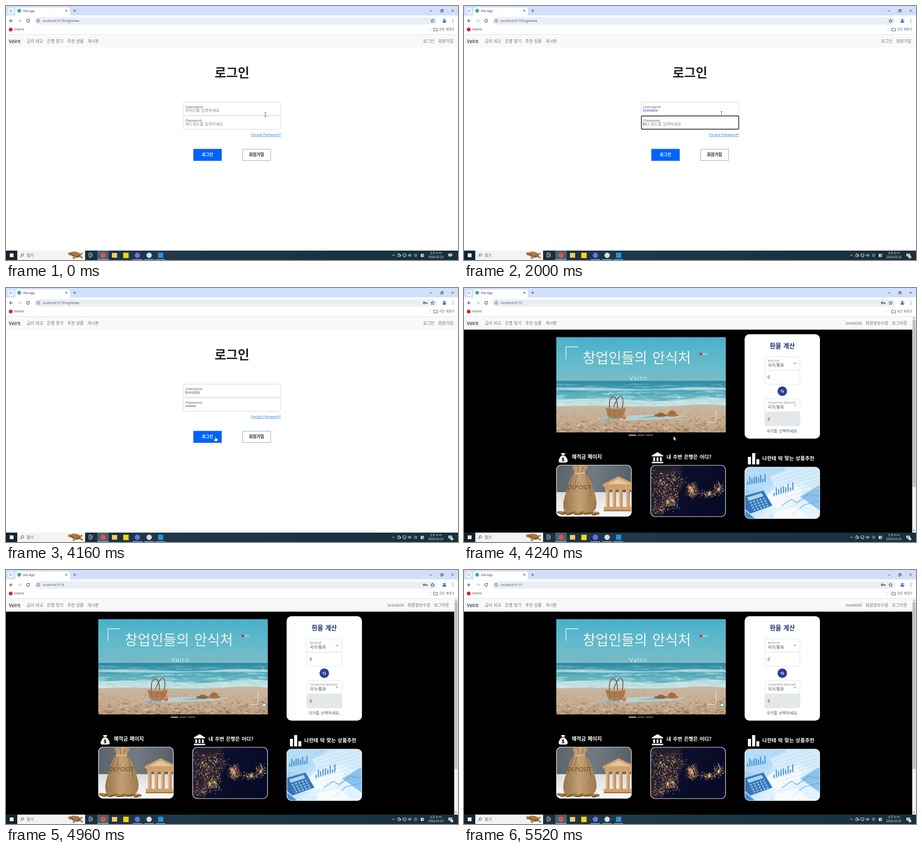
Animation of 960 by 540 pixels, one loop 5.6 s. Source, as an HTML page with a canvas:

```html
<!DOCTYPE html>
<html lang="ko">
<head>
<meta charset="utf-8">
<title>Login demo</title>
<style>
html, body { margin: 0; width: 100%; height: 100%; overflow: hidden; background: #fff; }
canvas { display: block; width: 960px; height: 540px; }
</style>
</head>
<body>
<canvas id="stage" width="960" height="540"></canvas>
<script>
const LOOP = 5600, HOME_AT = 4200;
const BRAND = 'Velrit', USER = 'brenkitl4';
const UI = '"Noto Sans", "Noto Sans CJK KR", "Noto Sans CJK", sans-serif';
const ARIAL = '"Liberation Sans", "Noto Sans CJK KR", "Noto Sans CJK", sans-serif';
const KR = '"Noto Sans CJK KR", "Noto Sans CJK", sans-serif';
const stage = document.getElementById('stage').getContext('2d');
let c = stage;

// ---- helpers ----
function box(x, y, w, h, fill, r = 0, stroke, lw = 1) {
  c.beginPath();
  c.roundRect(x, y, w, h, r);
  if (fill) { c.fillStyle = fill; c.fill(); }
  if (stroke) { c.strokeStyle = stroke; c.lineWidth = lw; c.stroke(); }
}
function disc(x, y, rx, fill, ry = rx, turn = 0) {
  c.beginPath();
  c.ellipse(x, y, rx, ry, turn, 0, 7);
  c.fillStyle = fill;
  c.fill();
}
function ring(x, y, r, color, lw = 1, from = 0, to = 7) {
  c.beginPath();
  c.arc(x, y, r, from, to);
  c.strokeStyle = color; c.lineWidth = lw; c.stroke();
}
function path(d, fill, stroke, lw = 1) {
  const p = new Path2D(d);
  if (fill) { c.fillStyle = fill; c.fill(p); }
  if (stroke) { c.strokeStyle = stroke; c.lineWidth = lw; c.stroke(p); }
}
function text(s, x, y, size, color, { font = UI, weight = 400, align = 'left', gap = 0 } = {}) {
  c.font = `${weight} ${size}px ${font}`;
  c.textAlign = align;
  c.letterSpacing = gap + 'px';
  c.wordSpacing = (font === KR ? size * .13 : 0) + 'px';
  c.fillStyle = color;
  c.fillText(s, x, y);
}
function fade(x0, y0, x1, y1, ...colors) {
  const g = c.createLinearGradient(x0, y0, x1, y1);
  colors.forEach((k, i) => g.addColorStop(i / (colors.length - 1), k));
  return g;
}
function randomizer(seed) {
  return () => (seed = (seed * 16807) % 2147483647) / 2147483647;
}
function layer(draw) {
  const outer = c, cv = document.createElement('canvas');
  cv.width = 960; cv.height = 540;
  c = cv.getContext('2d');
  draw();
  c = outer;
  return cv;
}
function photo(x, y, w, h, r, draw, blur) {
  const picture = layer(() => { c.translate(20, 20); draw(); });
  c.save();
  c.beginPath();
  c.roundRect(x, y, w, h, r);
  c.clip();
  c.filter = `blur(${blur}px)`;
  c.drawImage(picture, x - 20, y - 20);
  c.restore();
}

// ---- browser and desktop ----
function browser(url) {
  box(0, 0, 960, 540, '#fff');
  box(0, 0, 960, 20, '#d0e0fc');
  box(4, 4, 13, 13, '#e9f1ff', 4);
  path('M8 9.2l2 2l2 -2', null, '#333');
  box(20, 3, 116, 20, '#fff', 6);
  disc(28, 10, 4, '#3fb27f');
  text('Vite App', 36, 13, 6.4, '#444');
  path('M126 8l4 4M130 8l-4 4M143 10h5.4M145.7 7.3v5.4', null, '#333', .9);
  path('M900 10.5h5M946 7.5l5 5M951 7.5l-5 5M923 9h4v4h-4zM924.5 9v-1.5h4v4h-1.5', null, '#222', .8);
  box(0, 20, 960, 40, '#fff');
  path('M14.5 31.5h-6M11 28.5l-3 3l3 3', null, '#444', 1.1);
  path('M26 31.5h6M29.5 28.5l3 3l-3 3', null, '#b8bbc0', 1.1);
  ring(47, 31.5, 3, '#444', 1.1, .2, 5.4);
  path('M50.5 27.8v3h-3z', '#444');
  box(61, 24, 855, 15.5, '#e9eef7', 7.75);
  ring(68.5, 31.5, 3.2, '#444', .8);
  path('M68.5 31v2.2M68.5 29.3v.8', null, '#444', .9);
  text(url, 78, 34, 6.7, '#555960');
  path('M906 27.8l1.1 2.5l2.7 .2l-2 1.8l.6 2.7l-2.4 -1.4l-2.4 1.4l.6 -2.7l-2 -1.8l2.7 -.2z', null, '#333', .9);
  disc(931, 31.5, 5.5, '#d3e3fd');
  disc(931, 29.7, 1.8, '#1456b8');
  path('M927.5 35q0 -3 3.5 -3t3.5 3z', '#1456b8');
  for (const y of [28.5, 31.5, 34.5]) disc(949, y, .8, '#444');
  disc(10, 50, 4, '#d8232a');
  text('Vidorfa', 17, 52.4, 6.3, '#555');
  path('M900.5 46v8', null, '#cfd6e4');
  path('M908.5 47h3l1 1.3h4v4.7h-8z', null, '#444', .9);
  text('모든 북마크', 920, 52.4, 6.5, '#555', { font: KR });
  box(0, 60, 960, 28.5, '#f8f9fa');
  box(0, 60, 960, 1, '#dfe2e7');
}
function navbar(links) {
  text(BRAND, 6, 78.5, 10.2, '#111');
  [['금리 비교', 44], ['은행 찾기', 87], ['추천 상품', 130], ['게시판', 173], ...links]
    .forEach(([s, x]) => text(s, x, 77.6, 8.7, '#707070', { font: KR }));
}
function turtle() {
  disc(136, 527, 4, '#a77b43', 3.2, .4);
  disc(148, 528.5, 11, '#87562d', 5.8, .22);
  disc(148, 527, 8, '#bd8850', 3.6, .22);
  path('M142 525l3 4m2 -5l1 6m5 -5l-1 6', null, '#6c411f', .9);
  disc(145, 534.5, 2.6, '#b18a55', 4, .7);
  disc(160, 534, 4.2, '#a77b43', 1.7, .5);
  disc(160, 527, 3, '#b18a55', 2, -.3);
}
function taskbar() {
  box(0, 520, 960, 20, fade(0, 0, 960, 0, '#15242f', '#20384a', '#1c3343', '#18303c'));
  box(8, 526, 8, 8, '#f4f7fa');
  box(24, 520, 144, 20, '#f3f3f3');
  ring(35, 529, 2.6, '#333', .9);
  path('M33 531l-3 3', null, '#333', .9);
  text('찾기', 44, 533, 8, '#555', { font: KR });
  turtle();
  path('M176 527h5v5h-5zM176 524.8h5M176 534.2h5M183.3 525v9', null, '#e8edf1', .9);
  box(194, 520, 24, 20, '#496171');
  disc(206, 530, 5.7, '#df5343');
  box(225, 525, 11, 10, '#f2cc62');
  box(249, 524.5, 11.5, 11.5, '#f7d313');
  disc(279, 530, 5.7, '#6673e6');
  disc(304, 530, 5.7, '#d9dce2');
  box(323, 524.5, 11, 11, '#2a91d9');
  for (const [x, w] of [[194, 24], [269, 20], [294, 20], [318, 20]]) box(x, 538.5, w, 1.5, '#75b9e8');
  const ink = '#e4ebef';
  path('M820 531.5l3 -3l3 3', null, ink);
  path('M832 528h4v5h-4zM836 530l2.5 -1.5v4zM833 526.5h3M843 527h6.5v4.5h-6.5zM844.5 533.5h4M854 529h2l2 -2v6l-2 -2h-2zM859.5 528q2 2 0 4', null, ink, .9);
  ring(870, 530, 3, '#aeb9c1', .9);
  path('M868.5 530h3M870 528.5v3', null, '#aeb9c1', .8);
  box(881, 527, 6.5, 6.5, ink);
  path('M882.5 529h2v3M886 528v5', null, '#20303c', .7);
  text('오후 8:33', 913, 527.2, 6.1, ink, { align: 'center' });
  text('2024-05-23', 913, 536.4, 6.2, ink, { align: 'center' });
  path('M939.5 526.5h8v5.5h-4l-1.5 2v-2h-2.5z', ink);
  path('M941 528.4h5M941 530.2h5', null, '#20303c', .6);
}
function badge() {
  disc(947, 533.5, 3, '#e8edf0');
  text('7', 947, 535.6, 5.5, '#1a2a35', { align: 'center' });
}
function keyIcon() {
  ring(888, 31.5, 1.8, '#333', 1.2);
  path('M890 31.5h5M892.5 31.5v2M894.5 31.5v2', null, '#333', 1.2);
}

// ---- login page ----
function loginPage() {
  browser('localhost:5173/loginview');
  navbar([['로그인', 886], ['회원가입', 918]]);
  text('로그인', 480, 151.5, 26.8, '#212529', { font: KR, weight: 700, align: 'center' });
  text('Forgot Password?', 584, 276, 7.66, '#2f7fe0', { align: 'right' });
  box(520, 277, 64, .8, '#2f7fe0');
  box(398, 304, 60, 25, '#0062ff', 0, '#4b83dc', .8);
  box(502.5, 304.5, 59.5, 24, '#fff', 0, '#91a5c8');
  const bold = { font: KR, weight: 700, align: 'center' };
  text('로그인', 428, 319.2, 8.7, '#fff', bold);
  text('회원가입', 532, 319.2, 8.7, '#222', bold);
  taskbar();
}
function field(y, label, hint, focused) {
  box(376.5, y + .5, 207, 28.5, '#fff', 2, '#d6d6d6');
  if (focused) box(376.7, y + .7, 206.8, 28, null, 2, '#17171c', 1.5);
  text(label, 381, y + 12.6, 8, '#666', { font: ARIAL });
  if (hint) text(hint, 381, y + 21.2, 8.4, '#858585', { font: KR });
}
const typed = (t, start, step, max) => Math.max(0, Math.min(max, Math.floor((t - start) / step) + 1));

function loginState(t) {
  const nameLen = typed(t, 720, 110, USER.length);
  const dots = typed(t, 2640, 120, 8);
  const focus = t < 400 || t >= 4080 ? '' : t < 1840 ? 'name' : 'pass';
  field(204, 'Username', nameLen ? '' : '아이디를 입력하세요', focus === 'name');
  field(233, 'Password', dots ? '' : '패스워드를 입력하세요', focus === 'pass');
  text(USER.slice(0, nameLen), 380.5, 225, 8.2, '#3d62c8', { font: ARIAL });
  const nameEnd = 381 + c.measureText(USER.slice(0, nameLen)).width;
  for (let i = 0; i < dots; i++) disc(382.3 + i * 2.85, 251, 1.15, '#3158c0');
  if (dots) keyIcon();
  if (t > 400) badge();

  const lastKey = focus === 'name'
    ? (nameLen ? 720 + (nameLen - 1) * 110 : 400)
    : (dots ? 2640 + (dots - 1) * 120 : 1840);
  if (focus && (t - lastKey) % 1060 < 530) {
    const [x, y] = focus === 'name' ? [nameEnd, 218] : [380.5 + dots * 2.85, 247];
    box(x, y, .8, 8.5, '#333');
  }
}

// ---- home page pictures ----
function beach() {
  const rnd = randomizer(71);
  box(-20, -20, 400, 115, fade(0, 0, 0, 95, '#48b0cb', '#58b7cc', '#66bbcb', '#7cbcc6'));
  for (let i = 0; i < 14; i++) disc(rnd() * 360, 74 + rnd() * 16, 40, 'rgba(120,175,188,.15)', 3);
  box(-20, 93, 400, 62, fade(0, 93, 0, 150, '#2b86a2', '#4aa5b7', '#6fbcc6', '#a9d3d3'));
  for (let i = 0; i < 230; i++) {
    const depth = rnd();
    box(rnd() * 400 - 30, 98 + depth * 46, 8 + rnd() * 30, .7 + depth * 1.5,
      rnd() < .35 ? 'rgba(42,135,158,.3)' : 'rgba(232,246,246,.4)', 1);
  }
  path('M-20 109Q60 105 130 109T250 108T380 110V113Q260 111 190 113T-20 112z', 'rgba(225,244,244,.6)');
  path('M-20 134Q70 127 150 133T280 131T380 134V147H-20z', 'rgba(226,240,237,.6)');
  path('M-20 148Q60 144 140 147T270 145T380 148V223H-20z', fade(0, 145, 0, 203, '#c6b7a3', '#c8ae92', '#b99a7b'));
  for (let i = 0; i < 800; i++) {
    const depth = rnd(), size = .8 + depth * 2.2;
    disc(rnd() * 380 - 10, 151 + depth * 55, size * (.7 + rnd()),
      rnd() < .5 ? 'rgba(100,78,62,.36)' : 'rgba(232,214,190,.42)', size * .45);
  }
  path('M82 174L122 168L210 165L278 167L242 173L152 177z', '#b5d2d8');
  path('M90 174l34 -4l15 6zM170 172l40 -5l26 3z', '#7facba');
  path('M113 151Q111 128 121 127Q130 127 130 151M122 149Q129 125 138 126Q144 130 140 152', null, '#6a432c', 1.6);
  path('M104 150Q126 154 148 150L142 171Q125 176 110 170z', '#b08055');
  path('M106 156Q126 160 146 156M108 162Q126 166 144 162M112 152l3 18M124 153v20M137 153l-2 18', null, '#8f6340', 1);
  disc(144, 170, 4.5, '#d9693a');
  disc(144, 168, 2, '#f4a259');
  disc(222, 166, 14, '#8d5f3a', 3);
  disc(222, 164, 7, '#94613a', 3.5);
  disc(246, 166, 14, '#ab7446', 3);
  path('M237 165Q238 155 246 156Q254 156 255 165z', '#a86d40');
}
function caption() {
  path('M216.5 151V125H243', null, '#eef6f6', 1.4);
  path('M535.5 259V286H516', null, 'rgba(245,245,240,.75)', 1.2);
  text('창업인들의 안식처', 367, 158.5, 29.8, '#f5f3ea', { font: KR, weight: 300, align: 'center' });
  text(BRAND, 351, 195.5, 12.5, '#f3f4ed', { font: 'Inter, sans-serif', weight: 300, gap: 1.6 });
  disc(503, 140, 2.8, '#d72a20');
  text('REC', 507, 142.2, 6, '#e9f4f3');
}
function deposit() {
  const rnd = randomizer(9);
  box(-20, -20, 200, 80, fade(0, 0, 160, 20, '#59636b', '#727b81', '#565f68'));
  box(-20, 58, 200, 72, fade(0, 58, 0, 110, '#dcdcdb', '#fbfbfb'));
  path('M99 41L132 24L168 41V46H99zM103 46H168V53H103zM101 89H168V99H101z', '#d0a06c');
  path('M108 41L132 29L158 41z', '#e6c596');
  for (const x of [105, 119, 133, 148]) box(x, 53, 8, 37, fade(x, 0, x + 8, 0, '#e9c597', '#b98552'));
  path('M101 97H168', null, '#a2703f', 2);
  disc(49, 101, 40, 'rgba(90,75,60,.25)', 6);
  path('M34 4Q40 -1 46 3Q53 -2 58 2Q64 0 68 4L60 16Q74 30 80 56Q91 88 80 98Q47 106 18 98Q10 87 22 55Q27 30 39 16z',
    fade(14, 0, 85, 0, '#96754c', '#c6a376', '#9d7a4e'));
  path('M46 4L48 16M57 4L54 16M38 21Q28 42 25 58M62 20Q71 43 74 66M43 22L40 41', null, '#80623f', 1.2);
  path('M38 17Q50 20 61 16', null, '#dcc199', 2.2);
  for (let i = 0; i < 220; i++) disc(22 + rnd() * 55, 30 + rnd() * 66, .7, 'rgba(95,65,35,.25)');
  for (let i = 0; i < 14; i++) {
    const x = 7 + i * 6.1, y = 99 + rnd() * 5;
    disc(x, y + 1.4, 5.5, '#5f4420', 2.4);
    disc(x, y, 5.5, '#ab8443', 2);
  }
}
function nightLights() {
  const rnd = randomizer(42);
  box(-20, -20, 200, 150, fade(0, 0, 160, 110, '#13142b', '#0a0e2b', '#050922'));
  path('M-9 -9H70L60 22L74 38L64 54L52 78L28 101L-9 119z', 'rgba(50,38,48,.55)');
  path('M78 42L98 40L105 57L91 72L80 64z', 'rgba(82,55,42,.55)');
  // x, y, spread x, spread y, lights
  const towns = [[30, 50, 36, 44, 420], [43, 78, 22, 24, 170], [52, 28, 26, 22, 110],
    [87, 54, 15, 18, 190], [121, 62, 22, 10, 120], [145, 50, 13, 17, 110], [18, 94, 20, 16, 100]];
  for (const [x, y, sx, sy, n] of towns) {
    for (let i = 0; i < n; i++) {
      const px = x + (rnd() + rnd() - 1) * sx, py = y + (rnd() + rnd() - 1) * sy;
      disc(px, py, .4 + rnd() * .7, ['#c79a6a', '#8e6044', '#f5dcae', '#664639'][Math.floor(rnd() * 4)]);
    }
  }
  for (const [x, y] of [[84, 48], [88, 54], [37, 78], [47, 75], [125, 61], [145, 52]]) {
    disc(x, y, 5, 'rgba(255,194,111,.3)');
    disc(x, y, 1.8, '#ffe6a9');
  }
}
function charts() {
  box(-20, -20, 200, 150, fade(0, 0, 160, 110, '#7cbdf0', '#e0f3fe', '#6ba9e0'));
  path('M-9 -9H76L100 24L14 50L-9 44z', '#b5dbf6');
  path('M54 21L122 -9H170V44L77 68z', '#d6edfb');
  path('M38 62L117 32L165 57V119H70z', '#e2f3fd');
  path('M118 63L170 32V100z', '#8cc3ec');
  disc(84, 62, 38, 'rgba(255,255,255,.65)', 22, -.3);
  for (let i = 0; i < 9; i++) {
    const h = 7 + 10 * Math.abs(Math.sin(i * 1.8));
    box(5 + i * 4.6, 38 - h - i * .8, 2.6, h, '#4a94d6');
    box(61 + i * 5, 62 - h - i * 1.6, 2.8, h, '#5a9fdc');
  }
  for (let i = 0; i < 11; i++) path(`M${56 + i * 3} ${11 + i * 7}l90 -29`, null, 'rgba(80,150,210,.3)', .8);
  path('M78 83L99 69L112 76L135 58L158 62M102 101L125 81L160 72', null, '#5d9cd3', 1.2);
  path('M66 94L112 84L150 119H60z', 'rgba(255,255,255,.7)');
  path('M-5 63L40 50L59 82L12 99L-5 84z', '#3575b8');
  path('M5 65L36 55L40 62L9 72z', '#a9d7ee');
  for (let row = 0; row < 4; row++)
    for (let col = 0; col < 5; col++) disc(13 + col * 7 + row * 2.6, 76 - col * 2.2 + row * 5, 2.3, '#a5cfee', 1.6, -.3);
  path('M-5 88L34 119H-5z', '#4a8bcb');
}

// ---- home page ----
function converter() {
  box(596, 98.3, 160, 222, '#fff', 10);
  text('환율 계산', 676, 127.5, 13.3, '#26376f', { font: KR, weight: 700, align: 'center' });
  const line = '#dee2e6';
  box(639, 146, 74.5, 28.5, '#fff', 3, line);
  box(639, 175, 74.5, 29.5, '#fff', 3, line);
  box(639, 235, 74.5, 28.5, '#fff', 3, line);
  box(639, 263.5, 74.5, 29.5, '#e5e8eb', 3, line);
  text('Amount', 645, 157, 6.7, '#888');
  text('Converted Amount', 645, 246, 6.7, '#888');
  for (const y of [167, 256]) text('국가/통화', 645, y, 8.4, '#444', { font: KR });
  for (const y of [192.5, 281.5]) text('0', 645, y, 8.4, '#333');
  path('M700.5 158.7l2.7 2.7l2.7 -2.7M701.2 248.3l2 2l2 -2', null, '#444', 1);
  disc(676, 220.2, 10.4, 'rgba(40,50,80,.25)');
  disc(676, 219.3, 10, '#293f91');
  path('M674.3 222v-5l-1.8 2M677.5 216.5v5.5l2 -2.2', null, '#fff', 1.1);
  text('국가를 선택하세요.', 676, 307.3, 8.45, '#555', { font: KR, align: 'center' });
}
function headings() {
  path('M206 351h9l-2 4h-5zM207.5 356h6Q221 363 220 369Q219 371 216 371H205Q201 371 201 367Q202 361 207.5 356z', '#fff');
  text('$', 210.5, 368, 11, '#000', { weight: 700, align: 'center' });
  path('M399 356L411 349L423 356V358H399zM402 360h4v8h-4zM409 360h4v8h-4zM416 360h4v8h-4zM399 369.5h24v3h-24z', '#fff');
  path('M603 359h6.5v16h-6.5zM612 351h6.5v24h-6.5zM621 364h6.2v11h-6.2z', '#fff');
  const bold = { font: KR, weight: 700 };
  text('예적금 페이지', 229, 363.2, 10.85, '#fff', bold);
  text('내 주변 은행은 어디?', 430, 363.2, 10.7, '#fff', bold);
  text('나한테 딱 맞는 상품추천', 633.5, 365.5, 10.75, '#fff', bold);
}
function homePage() {
  browser('localhost:5173');
  keyIcon();
  navbar([['회원정보수정', 853], ['로그아웃', 909]]);
  text(USER, 811, 77.6, 8.1, '#707070');
  box(0, 88.5, 952, 432, '#000');
  box(952, 61, 8, 459, '#f1f1f1');
  box(952.7, 68, 6.5, 355, '#c1c1c1');
  path('M953.5 65.5l2.2 -2.5l2.2 2.5z', '#777');
  path('M953.5 514.5l2.2 2.5l2.2 -2.5z', '#555');
  photo(196, 104.5, 360, 202.5, 0, beach, .7);
  caption();
  [350, 368, 386].forEach((x, i) => box(x, 312, 15.5, 1.6, i ? '#858585' : '#fff'));
  path('M209 204l-5 5.5l5 5.5', null, 'rgba(255,255,255,.3)');
  converter();
  headings();
  [[196, 376, deposit], [396, 376.5, nightLights], [596, 380.5, charts]].forEach(([x, y, draw]) => {
    photo(x, y, 160, 110, 10, draw, .6);
    box(x + .5, y + .5, 159, 109, null, 10, '#f2f2f2', 1.2);
  });
  text('DEPOSIT', 245, 427.5, 12.7, '#6f4330', { align: 'center' });
  taskbar();
  badge();
}

// ---- pointer ----
const pointerMoves = [
  [160, 480, 551, 231, 547, 229],
  [3620, 4020, 547, 229, 445, 315],
  [4360, 4880, 445, 315, 547, 279]
];
function pointerAt(t) {
  let pos = [551, 231];
  for (const [from, to, x0, y0, x1, y1] of pointerMoves) {
    if (t < from) break;
    const k = Math.min(1, (t - from) / (to - from)), e = k * k * (3 - 2 * k);
    pos = [x0 + (x1 - x0) * e, y0 + (y1 - y0) * e];
  }
  return pos;
}
const within = (x, y, l, t, r, b) => x >= l && x <= r && y >= t && y <= b;

function pointer(x, y, home) {
  const overField = !home && within(x, y, 376, 204, 584, 262);
  const overLink = home ? within(x, y, 502, 104, 556, 307)
    : within(x, y, 398, 304, 458, 329) || within(x, y, 520, 268, 584, 278);
  c.save();
  c.translate(x, y);
  if (overField) path('M-2 -4.5h1.5l.5 .5l.5 -.5h1.5M0 -4v8M-2 4.5h1.5l.5 -.5l.5 .5h1.5', null, '#444', .9);
  else if (overLink) path('M-1 1Q0 -1 1 1V4.5L4.5 5.2Q5.5 5.7 5 8L4 11H-1.5L-4 7.5Q-4 5.5 -1 7z', '#fff', '#222', .8);
  else path('M0 0V9L2.1 7.1L3.6 10.3L5 9.6L3.6 6.6H6.3z', '#fff', '#222', .7);
  c.restore();
}

const loginLayer = layer(loginPage), homeLayer = layer(homePage);

function frame(now) {
  const t = now % LOOP, home = t >= HOME_AT;
  c.drawImage(home ? homeLayer : loginLayer, 0, 0);
  const [x, y] = pointerAt(t);
  if (home) {
    const glow = .3 + .4 * Math.max(0, Math.min(1, (t - 4640) / 150));
    path('M543 204l5 5.5l-5 5.5', null, `rgba(255,255,255,${glow})`);
  } else loginState(t);
  pointer(x, y, home);
  requestAnimationFrame(frame);
}
requestAnimationFrame(frame);
</script>
</body>
</html>
```
